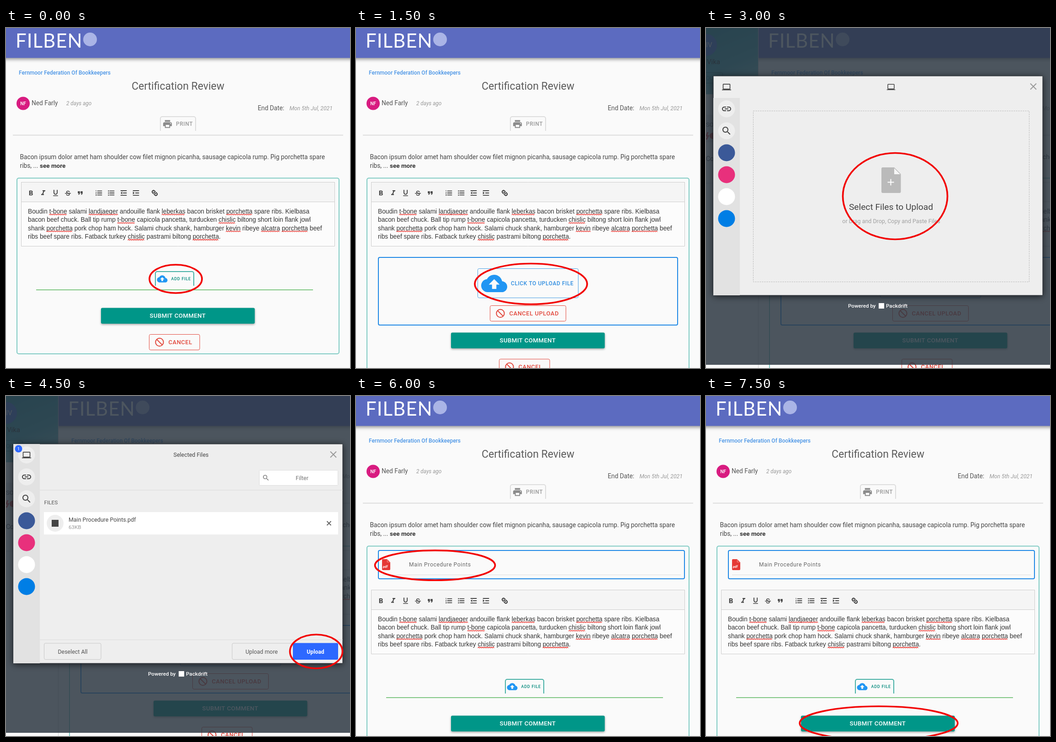
An HTML page with a canvas that plays this animation: 753 px wide and 744 px high, repeating every 8000 ms.

```html
<!DOCTYPE html>
<html lang="en">
<head>
<meta charset="utf-8">
<title>Attach a file to a comment</title>
<style>
html, body { margin: 0; width: 100%; height: 100%; overflow: hidden; background: #fafafa; }
canvas { display: block; width: 753px; height: 744px; }
</style>
</head>
<body>
<canvas id="stage" width="753" height="744"></canvas>
<script>
const ctx = document.getElementById('stage').getContext('2d');
const W = 753, H = 744, LOOP = 8000;
const TEAL = '#009688', BLUE = '#2196f3', FRAME = '#1e88e5', RED = '#e2483d', INK = '#444';
const BODY = 13.75, SMALL = 12.45;

// Icons on a 24 unit grid
const ICONS = {
  bold: 'M15.6 10.8c1-.7 1.65-1.8 1.65-2.8 0-2.26-1.75-4-4-4H7v14h7.04c2.09 0 3.71-1.7 3.71-3.8 0-1.5-.86-2.8-2.15-3.4zM10 6.5h3c.83 0 1.5.67 1.5 1.5s-.67 1.5-1.5 1.5h-3zm3.5 9H10v-3h3.5c.83 0 1.5.67 1.5 1.5s-.67 1.5-1.5 1.5z',
  italic: 'M10 4v3h2.2l-3.4 8H6v3h8v-3h-2.2l3.4-8H18V4z',
  underline: 'M12 17c3.3 0 6-2.7 6-6V3h-2.5v8c0 1.9-1.6 3.5-3.5 3.5S8.5 12.9 8.5 11V3H6v8c0 3.3 2.7 6 6 6zm-7 2v2h14v-2z',
  quote: 'M6 17h3l2-4V7H5v6h3zm8 0h3l2-4V7h-6v6h3z',
  ordered: 'M2 17h2v.5H3v1h1v.5H2v1h3v-4H2zm1-9h1V4H2v1h1zm-1 3h1.8L2 13.1v.9h3v-1H3.2L5 10.9V10H2zM7 5v2.3h14V5zm0 14h14v-2.3H7zm0-5.8h14v-2.4H7z',
  bullets: 'M2.5 4.5h3v3h-3zm0 6h3v3h-3zm0 6h3v3h-3zM7 5h14v2.3H7zm0 5.8h14v2.4H7zm0 5.9h14V19H7z',
  outdent: 'M3 4v2.5h18V4zm7 6.8v2.5h11v-2.5zM3 17.5V20h18v-2.5zM8 8v8l-5-4z',
  indent: 'M3 4v2.5h18V4zm7 6.8v2.5h11v-2.5zM3 17.5V20h18v-2.5zM3 8v8l5-4z',
  link: 'M3.9 12c0-1.7 1.4-3.1 3.1-3.1h4V7H7c-2.8 0-5 2.2-5 5s2.2 5 5 5h4v-1.9H7c-1.7 0-3.1-1.4-3.1-3.1zM8 13h8v-2H8zm9-6h-4v1.9h4c1.7 0 3.1 1.4 3.1 3.1s-1.4 3.1-3.1 3.1h-4V17h4c2.8 0 5-2.2 5-5s-2.2-5-5-5z',
  print: 'M19 8H5c-1.7 0-3 1.3-3 3v6h4v4h12v-4h4v-6c0-1.7-1.3-3-3-3zm-3 11H8v-5h8zm3-7c-.55 0-1-.45-1-1s.45-1 1-1 1 .45 1 1-.45 1-1 1zM18 3H6v4h12z',
  cloud: 'M19.35 10.04C18.67 6.6 15.64 4 12 4 9.1 4 6.6 5.64 5.35 8.04 2.34 8.36 0 10.9 0 14c0 3.3 2.7 6 6 6h13c2.76 0 5-2.24 5-5 0-2.64-2.05-4.78-4.65-4.96zM14 13v4h-4v-4H7l5-5 5 5z',
  laptop: 'M20 18c1.1 0 2-.9 2-2V5c0-1.1-.9-2-2-2H4c-1.1 0-2 .9-2 2v11c0 1.1.9 2 2 2H0v2h24v-2zM4 5h16v11H4z',
  search: 'M15.5 14h-.8l-.3-.3C15.4 12.6 16 11.1 16 9.5 16 5.9 13.1 3 9.5 3S3 5.9 3 9.5 5.9 16 9.5 16c1.6 0 3.1-.6 4.2-1.6l.3.3v.8l5 5 1.5-1.5zm-6 0C7 14 5 12 5 9.5S7 5 9.5 5 14 7 14 9.5 12 14 9.5 14z'
};
for (const k in ICONS) ICONS[k] = new Path2D(ICONS[k]);

function icon(name, cx, cy, size, color, { turn = 0, heavy = 0 } = {}) {
  ctx.save();
  ctx.translate(cx, cy);
  ctx.rotate(turn);
  ctx.scale(size / 24, size / 24);
  ctx.translate(-12, -12);
  ctx.fillStyle = ctx.strokeStyle = color;
  ctx.fill(ICONS[name], 'evenodd');
  if (heavy) { ctx.lineWidth = heavy; ctx.stroke(ICONS[name]); }
  ctx.restore();
}

function text(s, x, y, size, color, { style = '', family = 'Roboto, sans-serif', gap = 0, align = 'left' } = {}) {
  ctx.font = `${style} ${size}px ${family}`;
  ctx.letterSpacing = gap + 'px';
  ctx.textAlign = align;
  ctx.fillStyle = color;
  ctx.fillText(s, x, y);
}

function rect(x, y, w, h, color) {
  ctx.fillStyle = color;
  ctx.fillRect(x, y, w, h);
}

function box(x, y, w, h, r, { fill, stroke, line = 1 } = {}) {
  const d = stroke ? line / 2 : 0;
  ctx.beginPath();
  ctx.roundRect(x + d, y + d, w - 2 * d, h - 2 * d, r);
  if (fill) { ctx.fillStyle = fill; ctx.fill(); }
  if (stroke) { ctx.strokeStyle = stroke; ctx.lineWidth = line; ctx.stroke(); }
}

function disc(x, y, r, color) {
  ctx.beginPath();
  ctx.arc(x, y, r, 0, 7);
  ctx.fillStyle = color;
  ctx.fill();
}

function shape(color, x, y, ...rest) {
  ctx.beginPath();
  ctx.moveTo(x, y);
  for (let i = 0; i < rest.length; i += 2) ctx.lineTo(rest[i], rest[i + 1]);
  ctx.fillStyle = color;
  ctx.fill();
}

function lines(color, width, ...runs) {
  ctx.beginPath();
  for (const [x, y, ...rest] of runs) {
    ctx.moveTo(x, y);
    for (let i = 0; i < rest.length; i += 2) ctx.lineTo(rest[i], rest[i + 1]);
  }
  ctx.strokeStyle = color;
  ctx.lineWidth = width;
  ctx.stroke();
}

function cross(x, y, r, color, width) {
  lines(color, width, [x - r, y - r, x + r, y + r], [x - r, y + r, x + r, y - r]);
}

function shadowed(blur, dy, alpha, draw) {
  ctx.save();
  ctx.shadowColor = `rgba(0,0,0,${alpha})`;
  ctx.shadowBlur = blur;
  ctx.shadowOffsetY = dy;
  draw();
  ctx.restore();
}

function ring(x, y, rx, ry) {
  ctx.beginPath();
  ctx.ellipse(x, y, rx, ry, 0, 0, 7);
  ctx.strokeStyle = '#f20505';
  ctx.lineWidth = 3.7;
  ctx.stroke();
}

// Button outline that is cut off at the bottom
function openBox(x, y, w, h, color) {
  ctx.save();
  ctx.beginPath();
  ctx.rect(x, y, w, h);
  ctx.clip();
  box(x, y, w, h + 6, 4, { stroke: color, line: 2 });
  ctx.restore();
}

function cancelButton(label, x, y, w) {
  box(x, y, w, 35, 3, { stroke: RED });
  const cx = x + 23, cy = y + 17.5;
  ctx.beginPath();
  ctx.arc(cx, cy, 8.7, 0, 7);
  ctx.strokeStyle = RED;
  ctx.lineWidth = 2;
  ctx.stroke();
  lines(RED, 2, [cx - 6, cy - 6, cx + 6, cy + 6]);
  text(label, x + 42.5, y + 21.5, 13, RED, { style: '500', gap: 0.5 });
}

const DRAFT = [
  'Boudin t-bone salami landjaeger andouille flank leberkas bacon brisket porchetta spare ribs. Kielbasa',
  'bacon beef chuck. Ball tip rump t-bone capicola pancetta, turducken chislic biltong short loin flank jowl',
  'shank porchetta pork chop ham hock. Salami chuck shank, hamburger kevin ribeye alcatra porchetta beef',
  'ribs beef spare ribs. Fatback turkey chislic pastrami biltong porchetta.'
];
const MISSPELT = /t-bone|landjaeger|leberkas|porchetta|chislic|kevin|alcatra/g;

function squiggle(x, y, w) {
  ctx.beginPath();
  ctx.moveTo(x, y + 1);
  for (let i = 1; i * 2 <= w; i++) ctx.lineTo(x + i * 2, y + (i % 2 ? -1 : 1));
  ctx.strokeStyle = '#e8322c';
  ctx.lineWidth = 1.2;
  ctx.stroke();
}

function editor(y) {
  box(33, y, 687, 141, 0, { fill: '#fcfcfc', stroke: '#ccc' });
  box(33, y, 687, 44, 0, { fill: '#f5f5f5', stroke: '#ccc' });
  const cy = y + 24;
  const tools = ['bold', 'italic', 'underline', '', 'quote', '', 'ordered', 'bullets', 'outdent', 'indent'];
  tools.forEach((t, i) => t && icon(t, (i > 5 ? 41.5 : 54.5) + i * 27, cy + (t === 'bold' ? 0.8 : 0), 18, INK));
  text('S', 135.5, cy + 5.5, 15, INK, { style: '500', align: 'center' });
  rect(129, cy, 13, 1.5, INK);
  icon('link', 325.5, cy, 17.5, '#333', { turn: Math.PI / 4, heavy: 1 });
  DRAFT.forEach((s, i) => {
    const by = y + 69 + i * 18.4;
    text(s, 48, by, BODY, '#333', { family: '"Liberation Sans", Arial, sans-serif' });
    for (const m of s.matchAll(MISSPELT)) {
      squiggle(48 + ctx.measureText(s.slice(0, m.index)).width, by + 2.2, ctx.measureText(m[0]).width);
    }
  });
}

function addFile(y) {
  openBox(326, y, 86, 32, '#45b0a5');
  icon('cloud', 342, y + 17, 23, BLUE);
  text('ADD FILE', 361.5, y + 20, 9, '#00897b', { style: '500', gap: 0.75 });
  rect(66, y + 40, 606, 2, '#81c784');
}

function uploadPanel() {
  box(48, 501, 657, 150, 3, { stroke: FRAME, line: 2 });
  box(266, 526, 221, 65, 3, { stroke: '#4a9fe4' });
  icon('cloud', 302.5, 559, 57, BLUE);
  text('CLICK TO UPLOAD FILE', 339, 563, 12, '#2f8de0', { style: '500', gap: 0.55 });
  cancelButton('CANCEL UPLOAD', 293, 607, 167);
}

function attachment() {
  box(48, 337, 672, 64, 3, { stroke: FRAME, line: 2 });
  box(57, 357, 18, 24, 2, { fill: '#e53935' });
  shape('#fafafa', 68, 357, 75, 364, 75, 357);
  lines('#f28b86', 1.2, [68.5, 357, 68.5, 363.5, 75, 363.5]);
  text('pdf', 59, 376, 7, '#fff', { style: 'italic 700' });
  text('Main Procedure Points', 116, 372.5, 12.2, '#666', { gap: 0.6 });
  rect(57, 391, 654, 1, '#ddd');
}

function header(width) {
  shadowed(7, 3, 0.38, () => rect(-10, 0, width + 20, 65.5, '#5c6bc0'));
  text('FILBEN', 21, 43, 42, '#fff', { family: 'Lato, sans-serif', gap: 1 });
  disc(184, 25, 15, '#aab4e6');
}

function page(mode) {
  const shift = { add: 0, upload: 54, done: 87 }[mode];
  header(W);
  text('Fernmoor Federation Of Bookkeepers', 28, 101.5, 12, '#4a95e6', { style: '500' });
  text('Certification Review', 275, 135, 23, '#5c5c5c');
  disc(37.5, 165, 14.5, '#d81b80');
  text('NF', 37.5, 169, 10, '#fff', { style: '500', align: 'center' });
  text('Ned Farly', 56, 169, BODY, '#555');
  text('2 days ago', 132, 169, 11.8, '#999', { style: 'italic' });
  text('End Date:', 551, 179.5, BODY, '#555');
  text('Mon 5th Jul, 2021', 620.5, 179.5, 12.2, '#999', { style: 'italic' });
  openBox(337, 193, 79, 32, '#ddd');
  icon('print', 353.5, 210, 23, '#8c8c8c');
  text('PRINT', 372, 214.3, 12, '#999', { style: '500', gap: 0.6 });
  rect(15, 233.5, 723, 2, '#ddd');
  text('Bacon ipsum dolor amet ham shoulder cow filet mignon picanha, sausage capicola rump. Pig porchetta spare', 30.5, 287, BODY, INK);
  text('ribs, ...', 30.5, 306, BODY, INK);
  text('see more', 74, 306, 13.5, '#333', { style: '700' });

  box(23, 327.5, 707, 386.5 + shift, 4, { stroke: '#80cbc4', line: 2 });
  editor(mode === 'done' ? 424 : 337);
  if (mode === 'upload') uploadPanel();
  else addFile(532 + shift);
  if (mode === 'done') attachment();

  const y = 612.5 + shift;
  shadowed(4, 2, 0.35, () => box(208, y, 336.5, 34.5, 3, { fill: TEAL }));
  text('SUBMIT COMMENT', 314.5, y + 21.3, 13.3, '#fff', { style: '500', gap: 0.35 });
  cancelButton('CANCEL', 313, 670 + shift, 111.5);
}

function sideMenu() {
  rect(0, 0, 115, H, '#fafafa');
  const g = ctx.createLinearGradient(0, 0, 60, 145);
  g.addColorStop(0, '#1a8c9c');
  g.addColorStop(0.6, '#3aa3ae');
  g.addColorStop(1, '#7cc6c8');
  rect(0, 0, 115, 145, g);
  disc(0, 37, 24, '#3f6fd8');
  text('IV', 0, 42, 15, '#fff');
  text('Vika', 2, 79, 15, '#222');
  box(-40, 97, 77, 24, 3, { stroke: '#1f6f78' });
  text('OUT', 0, 114, 12, '#1f6f78');
  rect(0, 190, 115, 60, '#e4e4e4');
  text('SO', 0, 216, 13, '#555');
  disc(15, 236, 7, '#d32f2f');
  lines('#d32f2f', 3, [4, 228, 1, 236, 5, 236, 1, 244]);
  text('Co', 0, 291, 14, '#444');
  rect(0, 339, 115, 1, '#ddd');
  rect(114, 0, 1, H, '#d4d4d4');
}

function backdrop() {
  ctx.save();
  ctx.translate(115, 0);
  page('upload');
  ctx.restore();
  sideMenu();
  rect(0, 0, W, 737, 'rgba(44,54,65,0.84)');
  shadowed(14, 2, 0.7, () => rect(16, 105, 721, 480, '#eee'));
  box(15.5, 104.5, 722, 481, 1, { stroke: '#2b2f34' });
  text('Powered by', 311, 612, 11.6, '#fff', { style: '500' });
  rect(378, 602, 12, 12, '#fff');
  text('Packdrift', 394, 612, 11.6, '#fff', { style: '500' });
  cross(716.5, 128, 6.5, '#999', 2);
}

function sources(top) {
  rect(16, top, 58, 585 - top, '#e2e2e2');
  const fills = ['#eee', '#eee', '#3b5998', '#e8307c', '#fff', '#007ee5'];
  fills.forEach((c, i) => disc(45, 177 + i * 48, 18.5, c));
  icon('link', 45, 177, 24, INK);
  icon('search', 45, 225, 24, INK);
}

function pickFiles() {
  backdrop();
  sources(153);
  icon('laptop', 45, 129.5, 20, INK);
  icon('laptop', 405, 129.5, 18.5, INK);
  ctx.setLineDash([3, 2]);
  box(103, 181, 605, 375, 0, { stroke: '#b8b8b8' });
  ctx.setLineDash([]);
  box(384, 305, 42.5, 56, 3, { fill: '#bababa' });
  shape('#eee', 412, 305, 427, 320, 427, 304, 412, 304);
  shape('#f6f6f6', 412, 307, 412, 320, 425, 320);
  lines('#fff', 2, [397.5, 337.5, 411.5, 337.5], [404.5, 330.5, 404.5, 344.5]);
  text('Select Files to Upload', 405, 397.5, 19.2, INK, { align: 'center' });
  text('or Drag and Drop, Copy and Paste Files', 405.5, 427, SMALL, '#a0a0a0', { align: 'center' });
}

function reviewFiles() {
  const mid = { align: 'center' };
  backdrop();
  sources(105);
  disc(45, 129, 18.5, '#eee');
  icon('laptop', 45, 129.5, 20, INK);
  disc(27.5, 115.5, 8, '#2d68ff');
  text('1', 27.5, 119, 9.5, '#fff', mid);
  text('Selected Files', 405, 132.5, SMALL, INK, mid);
  box(554, 162, 173, 34, 1, { fill: '#fff', stroke: '#ddd' });
  icon('search', 569, 179, 17, '#777');
  text('Filter', 648, 183.5, SMALL, '#757575', mid);
  rect(74, 205.5, 663, 1, '#dcdcdc');
  text('FILES', 83.5, 237, 11.8, '#555');
  rect(83, 254, 644, 49, '#fff');
  disc(107.5, 278.5, 18.5, '#eee');
  rect(100, 271, 15, 15, INK);
  text('Main Procedure Points.pdf', 137, 274.7, SMALL, INK);
  text('63KB', 137, 291, 11.6, '#999');
  cross(707, 278.5, 4.5, '#666', 2);
  rect(74, 533, 663, 1, '#dcdcdc');
  box(83, 540.5, 125.5, 36.5, 3, { stroke: '#c8c8c8' });
  text('Deselect All', 146, 563.5, SMALL, '#555', mid);
  box(494.5, 540.5, 135, 36.5, 3, { stroke: '#c8c8c8' });
  text('Upload more', 559.5, 563.5, SMALL, '#555', mid);
  box(628, 540.5, 99, 36.5, 3, { fill: '#2d68ff' });
  text('Upload', 677.5, 563.5, 12.2, '#fff', { ...mid, style: '700' });
}

const SCENES = [
  [1500, () => { page('add'); ring(371.5, 549, 57.5, 31); }],
  [3000, () => { page('upload'); ring(383, 560, 123, 44.5); }],
  [4500, () => { pickFiles(); ring(414, 368, 114.5, 94.5); }],
  [6000, () => { reviewFiles(); ring(679, 559, 57.5, 37); }],
  [7500, () => { page('done'); ring(173, 370.5, 131.5, 32.7); }],
  [LOOP, () => { page('done'); ring(378, 716, 173, 37); }]
];

const start = performance.now();
function frame() {
  const t = (performance.now() - start) % LOOP;
  rect(0, 0, W, H, '#fafafa');
  SCENES.find(([end]) => t < end)[1]();
  requestAnimationFrame(frame);
}
frame();
</script>
</body>
</html>
```
